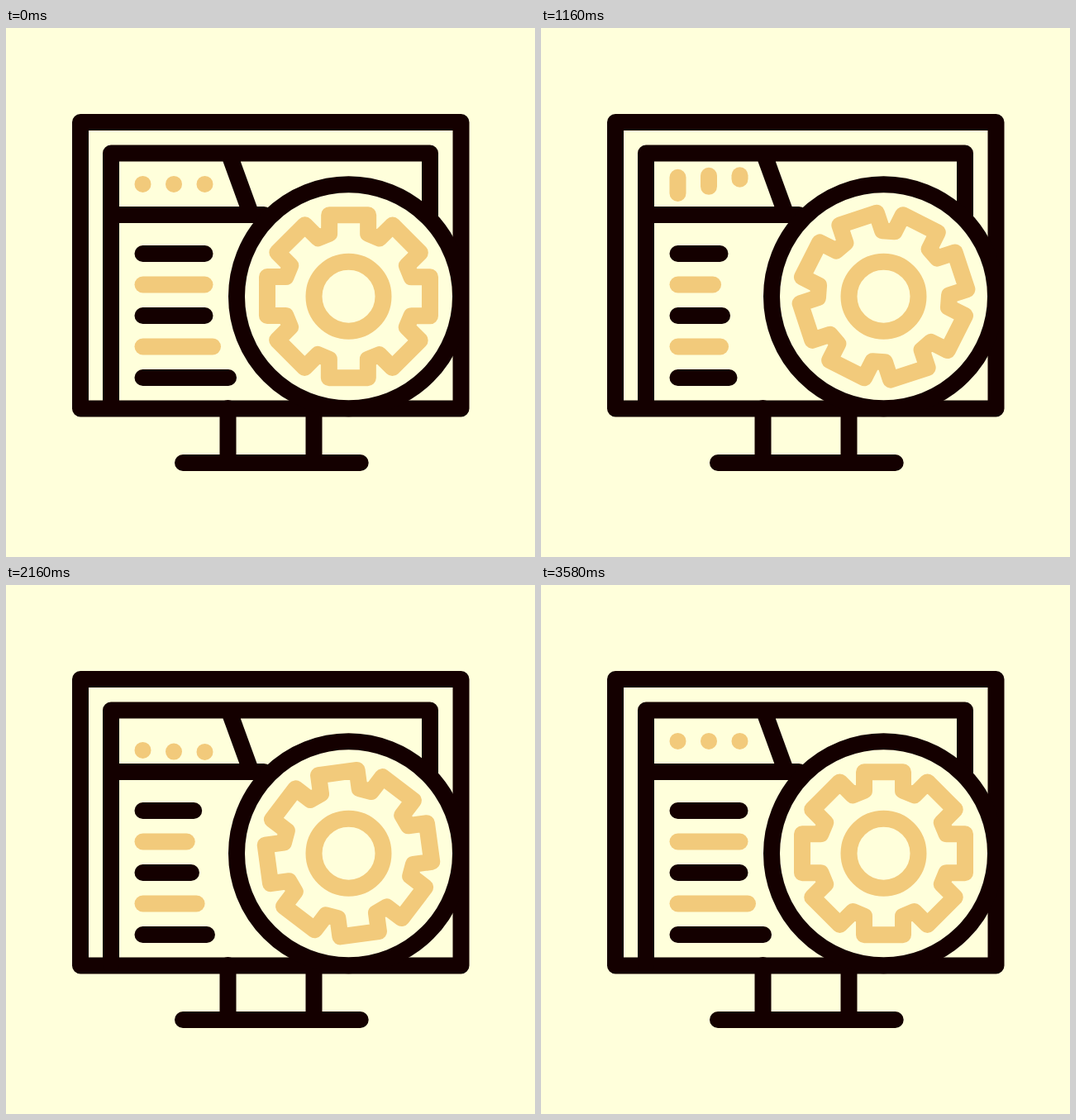
Animation of 640 by 640 pixels, one loop 3600 ms. Source, as an HTML page:

```html
<!DOCTYPE html>
<html lang="en">
<head>
<meta charset="utf-8">
<title>Monitor with gear</title>
<style>
  html, body { margin: 0; height: 100%; overflow: hidden; background: #ffffdb; }
  svg { display: block; width: 100vw; height: 100vh; }
  path, circle, rect { fill: none; stroke: #140000; stroke-width: 20; stroke-linecap: round; stroke-linejoin: round; }
  .tan { stroke: #f2ca7b; }
</style>
</head>
<body>
<svg viewBox="0 0 640 640">
  <rect x="90" y="114" width="460.5" height="346.5"/>
  <path d="M127 460V151.5H513V232M127 226H312M269.7 152L296.6 226"/>
  <path d="M268.5 460V526M372.5 460V526M214 526H428.7"/>
  <g id="marks"></g>
  <circle cx="414.5" cy="324.7" r="135.5" style="fill:#ffffdb"/>
  <circle class="tan" cx="414.5" cy="324.7" r="42"/>
  <path class="tan" id="gear"/>
</svg>
<script>
const LOOP = 3600, STEP = 20, LAST = 179;
const marks = document.getElementById('marks');
const gear = document.getElementById('gear');

function addMark(tan) {
  const path = document.createElementNS('http://www.w3.org/2000/svg', 'path');
  if (tan) path.setAttribute('class', 'tan');
  return marks.appendChild(path);
}

// Smooth 0 to 1 between two ticks
function ramp(from, to, tick) {
  const p = Math.min(1, Math.max(0, (tick - from) / (to - from)));
  return p * p * (3 - 2 * p);
}

// One tooth, repeated every 45 degrees
const tooth = [[-23.5, -76], [-23.5, -98.5], [23.5, -98.5], [23.5, -76]];
const points = [];
for (let i = 0; i < 8; i++) {
  const c = Math.cos(i * Math.PI / 4), s = Math.sin(i * Math.PI / 4);
  for (const [x, y] of tooth) points.push([x * c - y * s, x * s + y * c].map(v => v.toFixed(2)));
}
gear.setAttribute('d', 'M' + points.join('L') + 'Z');

const dots = [165.5, 203, 240.5].map(x => ({ x, path: addMark(true) }));

// right: resting end, shrink: distance pulled in, turn: tick when fully pulled in
const bars = [
  [240.5, 25, 66], [240.5, 36, 72], [240.5, 25, 76], [250, 35, 68], [269, 45, 70]
].map(([right, shrink, turn], i) => ({ right, shrink, turn, y: 273 + 37.5 * i, path: addMark(i % 2) }));

function draw(now) {
  const tick = Math.min(LAST, (now % LOOP) / STEP);
  gear.setAttribute('transform', `translate(414.5 324.7) rotate(${360 * tick / LAST})`);

  dots.forEach(({ x, path }, i) => {
    const t = tick - 6 * i;
    const base = 188.9 - 10.6 * ramp(0, 32, t) - 13.1 * ramp(98, 138, t);
    const top = base + 23.7 * ramp(48, 98, t);
    const bottom = base + 23.7 * ramp(40, 62, t);
    path.setAttribute('d', `M${x} ${top}V${bottom}`);
  });

  for (const { right, shrink, turn, y, path } of bars) {
    const pull = ramp(0, turn, tick) - ramp(turn + 9, 144, tick);
    path.setAttribute('d', `M165.5 ${y}H${right - shrink * pull}`);
  }
  requestAnimationFrame(draw);
}
draw(0);
</script>
</body>
</html>
```
